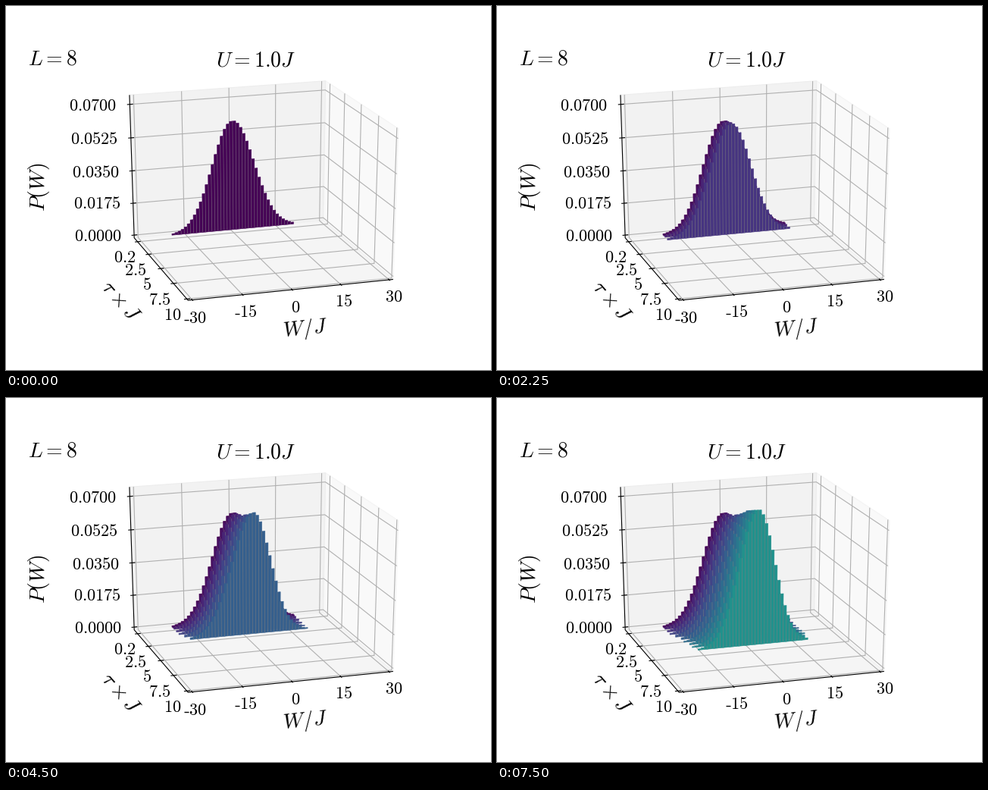
Recreate the animation shown at these times as a matplotlib script. Size 640 by 480 pixels, loop 8 s.

```python
import numpy as np
import matplotlib.pyplot as plt
from matplotlib.animation import FuncAnimation
from matplotlib.collections import LineCollection, PolyCollection

plt.rcParams["mathtext.fontset"] = "cm"

W, H, DPI = 640, 480, 100
SPIN, TILT = np.radians([17.5, 21.5])
PAD = 1 / 48                 # panes sit slightly outside the data box
LO, HI = -PAD, 1 + PAD
W_MAX, P_MAX = 30, 0.0733
STEPS = 11

fig = plt.figure(figsize=(W / DPI, H / DPI), dpi=DPI, facecolor="white")
ax = fig.add_axes([0, 0, 1, 1])
ax.set_xlim(0, W)
ax.set_ylim(H, 0)
ax.axis("off")


def project(x, y, z):
    """Perspective view of the unit box, in stage pixels."""
    x, y, z = np.broadcast_arrays(np.subtract(x, 0.5), np.subtract(y, 0.5),
                                  np.subtract(z, 0.5))
    near = -x * np.sin(SPIN) - y * np.cos(SPIN)
    depth = 10 - near * np.cos(TILT) - z * np.sin(TILT)
    right = x * np.cos(SPIN) - y * np.sin(SPIN)
    up = z * np.cos(TILT) - near * np.sin(TILT)
    return np.stack([334.7 + 2662 * right / depth,
                     237.4 - 1995 * up / depth], axis=-1)


def path(*points):
    return project(*np.array(points, float).T)


def box_x(work):
    return (np.asarray(work) + W_MAX) / (2 * W_MAX)


def box_y(tau):
    return 0.97 * (1 - np.asarray(tau) / 10)


def box_z(prob):
    return np.asarray(prob) / P_MAX


def draw_box():
    panes = [
        ((HI, HI, LO), (HI, LO, LO), (HI, LO, HI), (HI, HI, HI), 0.975),
        ((LO, HI, LO), (HI, HI, LO), (HI, HI, HI), (LO, HI, HI), 0.95),
        ((LO, LO, LO), (HI, LO, LO), (HI, HI, LO), (LO, HI, LO), 0.9625),
    ]
    for *corners, grey in panes:
        ax.fill(*path(*corners).T, fc=str(grey), ec=str(grey - 0.02),
                lw=0.8, zorder=1)

    grid, ticks = [], []
    out, inn = 0.014, 0.0167
    for x in box_x([-30, -15, 0, 15, 30]):
        grid.append(path((x, HI, HI), (x, HI, LO), (x, LO, LO)))
        ticks.append(path((x, LO - out, LO), (x, LO + inn, LO)))
    for y in box_y([0.2, 2.5, 5, 7.5, 10]):
        grid.append(path((LO, y, LO), (HI, y, LO), (HI, y, HI)))
        ticks.append(path((LO - out, y, LO), (LO + inn, y, LO)))
    for z in box_z(np.arange(5) * 0.0175):
        grid.append(path((LO, HI, z), (HI, HI, z), (HI, LO, z)))
        ticks.append(path((LO - out, HI, z), (LO + inn, HI, z)))
    ax.add_collection(LineCollection(grid, colors="#b0b0b0",
                                     linewidths=0.8, zorder=2))
    axes = path((LO, HI, HI), (LO, HI, LO), (LO, LO, LO), (HI, LO, LO))
    ax.add_collection(LineCollection([axes] + ticks, colors="black",
                                     linewidths=0.8, zorder=3))


def label(x, y, text, size=16, **kw):
    kw = {"ha": "center", "va": "center", **kw}
    ax.text(x, y, f"${text}$", fontsize=size, color="black", zorder=30, **kw)


def draw_labels():
    for i, x in enumerate((121.5, 120.5, 118.5, 116.5, 114.5)):
        label(x, (303.5, 261, 219.5, 176.5, 132.5)[i], f"{i * 0.0175:.4f}")
    for x, y, text in ((157, 332, "0.2"), (171, 349, "2.5"), (186, 368, "5"),
                       (203, 388, "7.5"), (220, 408, "10")):
        label(x, y, text)
    for x, y, work in ((249, 411.5, -30), (316, 404, -15), (382, 397.5, 0),
                       (446, 390, 15), (512, 384.5, 30)):
        shift = 3.7 if work < 0 else 0
        label(x + shift, y, abs(work))
        if work < 0:
            ax.plot([x - 14.5, x - 8.5], [y + 2, y + 2], color="black",
                    lw=1, solid_capstyle="butt", zorder=30)
    label(29, 77, "L=8", 20, ha="left", va="baseline")
    label(329.5, 79, "U=1.0J", 20, va="baseline")
    label(395, 427, "W/J", 20, rotation=5.9)
    label(43, 239, "P(W)", 20, rotation=90)
    label(152, 389, r"\tau \times J", 20, rotation=-48.8)


def histogram(n):
    """Bin edges and heights of the n-th work distribution."""
    keys = [0, 3, 5, 7, 10]

    def at(*vals):
        return np.interp(n, keys, vals)

    mode = at(0, 0.7, 2, 2.5, 3)
    peak = at(0.0589, 0.0597, 0.0624, 0.0665, 0.0705)
    right = at(6.9, 6.5, 5.6, 5.5, 5.3)
    left = np.sqrt(2 / np.pi) / peak - right      # unit area
    first = round(at(-20, -20, -19, -18, -16))
    last = round(at(20, 20, 20, 20, 19))
    edges = np.arange(first, last + 1)
    mid = edges[:-1] + 0.5
    sigma = np.where(mid < mode, left, right)
    return edges, peak * np.exp(-0.5 * ((mid - mode) / sigma) ** 2)


def add_series(n):
    tau = (0.1, 0.25, 0.5)[n] if n < 3 else 0.5 * (n - 1)
    y = box_y(tau)
    edges, probs = histogram(n)
    x, z = box_x(edges), box_z(probs)
    quads = np.stack([project(x[:-1], y, 0), project(x[:-1], y, z),
                      project(x[1:], y, z), project(x[1:], y, 0)], axis=1)
    color = plt.cm.viridis(n / 20)
    bars = PolyCollection(quads, facecolors=[color], edgecolors=[color],
                          linewidths=0.4, zorder=5 + n)
    seam = np.minimum(z[:-1], z[1:])
    lines = np.stack([project(x[1:-1], y, 0), project(x[1:-1], y, seam)],
                     axis=1)
    seams = LineCollection(lines, colors="0.5", linewidths=0.5, alpha=0.7,
                           zorder=5.5 + n)
    ax.add_collection(bars)
    ax.add_collection(seams)
    return bars, seams


draw_box()
draw_labels()
series = [add_series(n) for n in range(STEPS)]


def update(i):
    shown = i // 3
    for n, parts in enumerate(series):
        for part in parts:
            part.set_visible(n <= shown)
    return [part for parts in series for part in parts]


anim = FuncAnimation(fig, update, frames=32, interval=250,
                     init_func=lambda: update(0), repeat=True,
                     repeat_delay=0, blit=False)
plt.show()
```
